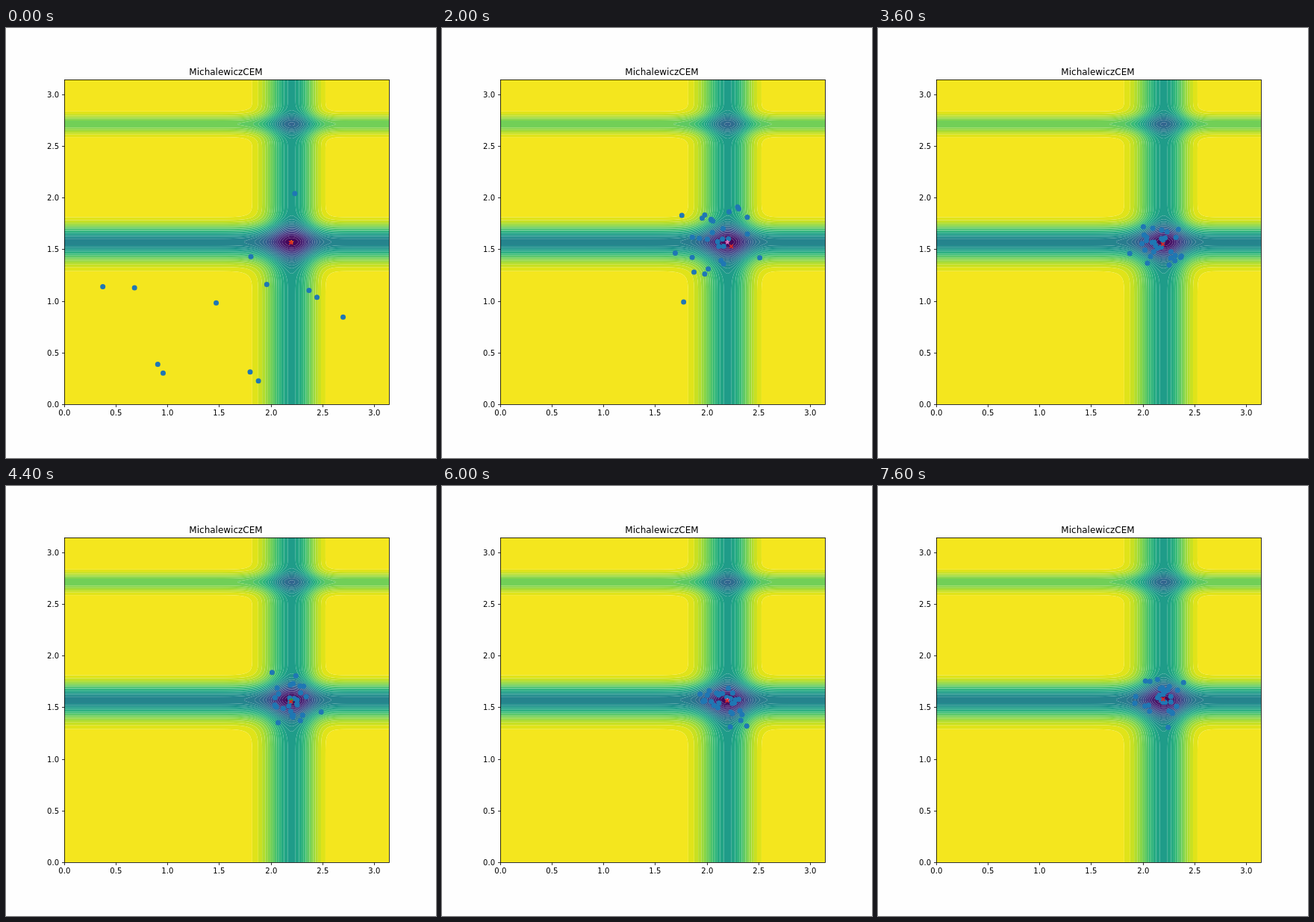
Write an HTML page with a canvas that moves like this. It is 576 by 576 pixels and loops after 8000 ms.

```html
<!DOCTYPE html>
<html lang="en">
<head>
<meta charset="utf-8">
<title>MichalewiczCEM</title>
<style>
  html, body { margin: 0; width: 100%; height: 100%; overflow: hidden; background: #fefefe; }
  canvas { display: block; width: 576px; height: 576px; }
</style>
</head>
<body>
<canvas id="view" width="576" height="576"></canvas>
<script>
const SIZE = 576, STEP_MS = 400, STEPS = 20;
const LEFT = 77.76, RIGHT = 512.64, TOP = 69.12, BOTTOM = 504;
const UNIT = (RIGHT - LEFT) / Math.PI;
const LEVEL = 0.06, LAYERS = 30;
const BEST = [382.3, 287];
const VIRIDIS = ('440154 481568 482677 453781 3F4788 39558C 32648E 2D718E 287D8E 238A8D ' +
  '1F968B 20A386 29AF7F 3CBC75 56C667 74D055 94D840 B8DE29 DCE318 FEE721').split(' ')
  .map(h => [0, 2, 4].map(i => parseInt(h.substr(i, 2), 16)));
const CYCLE = ['#1f77b4', '#ff7f0e', '#2ca02c', '#d62728', '#9467bd',
  '#8c564b', '#e377c2', '#7f7f7f', '#bcbd22', '#17becf'];

// Marked estimate: step, x, y
const ESTIMATES = [[0, 381.5, 287.5], [3, 354.5, 291.5], [5, 387.5, 292.5],
  [9, 381.5, 289.5], [17, 382, 287], [19, 382, 285.5]];

const clamp = (v, lo, hi) => Math.max(lo, Math.min(hi, v));

function viridis(t) {
  const p = Math.floor(t * 256) / 255 * (VIRIDIS.length - 1);
  const i = Math.min(Math.floor(p), VIRIDIS.length - 2);
  return VIRIDIS[i].map((c, k) => Math.round(c + (VIRIDIS[i + 1][k] - c) * (p - i)));
}

// One term of the Michalewicz function, with its sign flipped
const valley = (v, i) => Math.sin(v) * Math.sin(i * v * v / Math.PI) ** 20;
const depthX = px => valley((px - LEFT) / UNIT, 1);
const depthY = py => valley((BOTTOM - py) / UNIT, 2);

function paintContours(g) {
  const x0 = Math.round(LEFT), y0 = Math.round(TOP);
  const w = Math.round(RIGHT) - x0, h = Math.round(BOTTOM) - y0;
  const img = g.createImageData(w, h);
  const colors = Array.from({ length: LAYERS }, (_, k) => viridis(1 - (k + 0.5) / LAYERS));
  const color = k => colors[clamp(k, 0, LAYERS - 1)];
  for (let y = 0; y < h; y++) {
    const py = y0 + y + 0.5, fy = depthY(py), dy = depthY(py + 0.5) - depthY(py - 0.5);
    for (let x = 0; x < w; x++) {
      const px = x0 + x + 0.5, dx = depthX(px + 0.5) - depthX(px - 0.5);
      const f = fy + depthX(px);
      const edge = Math.round(f / LEVEL);
      const slope = Math.hypot(dx, dy) + 1e-9;
      // Share of the pixel in the deeper band; both bands are smoothed, so white shows between
      const a = edge > 0 && edge < LAYERS ? clamp(0.5 + (f - edge * LEVEL) / slope, 0, 1) : 1;
      const inner = color(edge > 0 ? edge : 0), outer = color(edge - 1);
      const rgb = inner.map((c, i) => (1 - a) * outer[i] + a * (a * c + (1 - a) * 255));
      img.data.set([...rgb, 255], (y * w + x) * 4);
    }
  }
  g.putImageData(img, x0, y0);
}

function paintAxes(g) {
  g.strokeStyle = g.fillStyle = '#000';
  g.lineWidth = 0.8;
  g.strokeRect(78.5, 69.5, 435, 435);
  g.font = '10px "DejaVu Sans", sans-serif';
  for (let v = 0; v <= 3; v += 0.5) {
    const x = Math.round(LEFT + v * UNIT) + 0.5;
    const y = Math.round(BOTTOM - v * UNIT) + 0.5;
    g.beginPath();
    g.moveTo(x, 504.5);
    g.lineTo(x, 508);
    g.moveTo(78.5, y);
    g.lineTo(75, y);
    g.stroke();
    g.textAlign = 'center';
    g.fillText(v.toFixed(1), x - 0.2, 519);
    g.textAlign = 'right';
    g.fillText(v.toFixed(1), 71, y + 3.5);
  }
  g.textAlign = 'center';
  g.font = '12px "DejaVu Sans", sans-serif';
  g.fillText('MichalewiczCEM', 294.5, 63);
}

function estimate(step) {
  const i = ESTIMATES.findIndex(e => e[0] >= step);
  const [s1, x1, y1] = ESTIMATES[i], [s0, x0, y0] = ESTIMATES[Math.max(0, i - 1)];
  const p = s1 > s0 ? (step - s0) / (s1 - s0) : 0;
  return [x0 + (x1 - x0) * p, y0 + (y1 - y0) * p];
}

// Gaussian samples that close in on the minimum as the search goes on
function samples(step) {
  let seed = step * 7919 + 17;
  const rand = () => (seed = (seed * 16807) % 2147483647) / 2147483647;
  rand();
  const gauss = () => (rand() + rand() + rand() + rand() - 2) * Math.sqrt(3);
  const cx = BEST[0] - 34 * Math.exp(-step / 6), cy = BEST[1] + 80 * Math.exp(-step);
  const sx = 16 + 75 * Math.exp(-step / 2.2), sy = 15 + 85 / (1 + (step / 4) ** 6);
  const count = Math.min(30, 14 + 8 * step);
  return Array.from({ length: count }, () => [cx + sx * gauss(), cy + sy * gauss()])
    .filter(([x, y]) => x > LEFT && x < RIGHT && y > TOP && y < BOTTOM);
}

const plot = document.createElement('canvas');
plot.width = plot.height = SIZE;
const pg = plot.getContext('2d');
pg.fillStyle = '#fefefe';
pg.fillRect(0, 0, SIZE, SIZE);
paintContours(pg);
paintAxes(pg);

const ctx = document.getElementById('view').getContext('2d');

function star(x, y, color) {
  ctx.beginPath();
  for (let i = 0; i < 10; i++) {
    const r = i % 2 ? 1.15 : 3, a = i * Math.PI / 5;
    ctx.lineTo(x + r * Math.sin(a), y - r * Math.cos(a));
  }
  ctx.closePath();
  ctx.fillStyle = ctx.strokeStyle = color;
  ctx.lineWidth = 1;
  ctx.fill();
  ctx.stroke();
}

function cross(x, y, r) {
  ctx.beginPath();
  ctx.moveTo(x - r, y - r);
  ctx.lineTo(x + r, y + r);
  ctx.moveTo(x - r, y + r);
  ctx.lineTo(x + r, y - r);
  ctx.strokeStyle = CYCLE[3];
  ctx.lineWidth = 1.8;
  ctx.stroke();
}

function draw(step) {
  ctx.drawImage(plot, 0, 0);
  ctx.fillStyle = CYCLE[0];
  for (const [x, y] of samples(step)) {
    ctx.beginPath();
    ctx.arc(x, y, 3.5, 0, 2 * Math.PI);
    ctx.fill();
  }
  star(...BEST, CYCLE[(step + 1) % CYCLE.length]);
  cross(...estimate(step), 2.3);
}

const start = performance.now();
let shown = -1;
function tick() {
  const step = Math.floor((performance.now() - start) / STEP_MS) % STEPS;
  if (step !== shown) draw(shown = step);
  requestAnimationFrame(tick);
}
tick();
</script>
</body>
</html>
```
